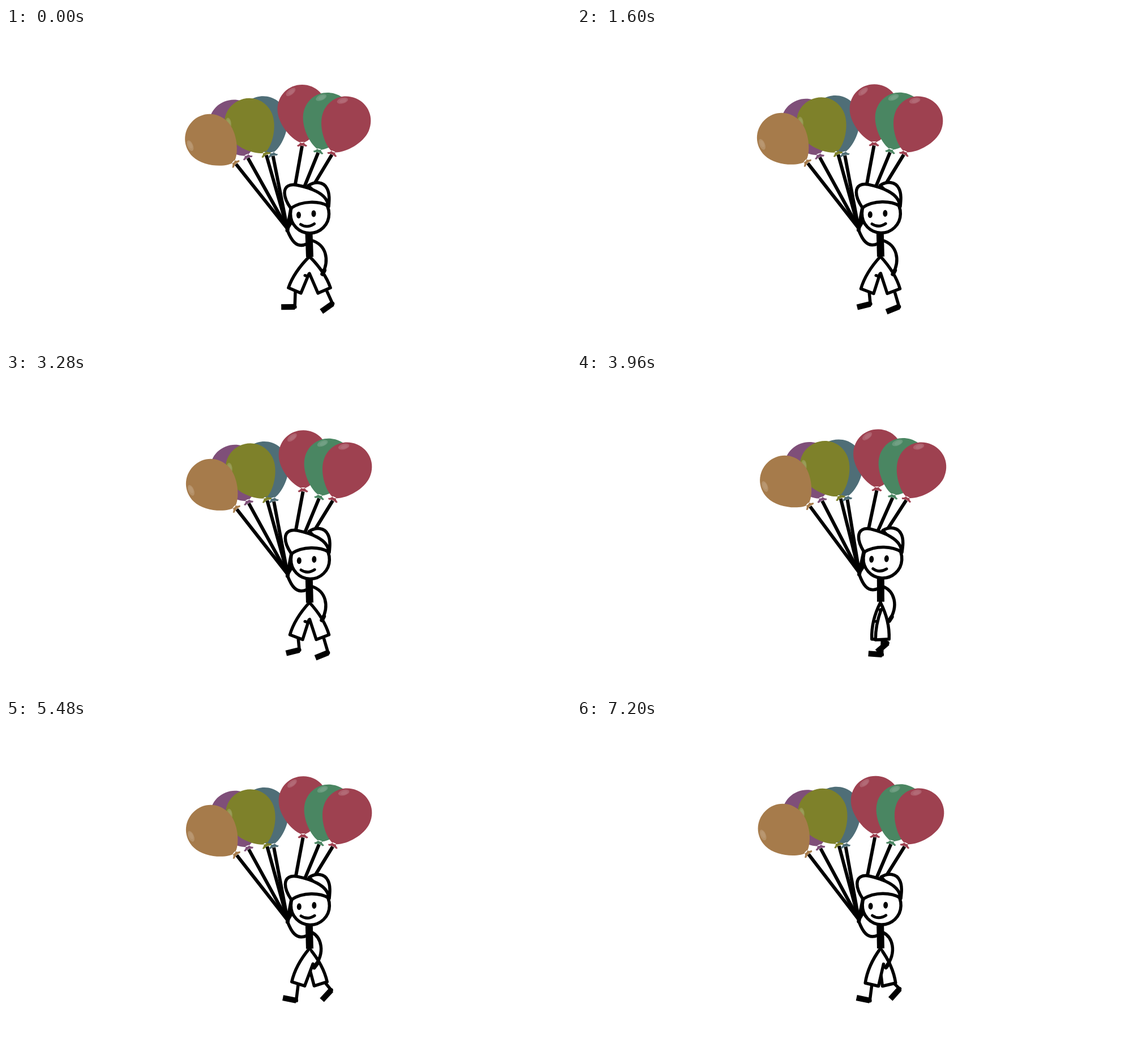
Animation, 998 px wide and 561 px high, one loop 7.24 s. Source, as an HTML page with a canvas:

```html
<!DOCTYPE html>
<html lang="en">
<head>
<meta charset="utf-8">
<title>Walking with balloons</title>
<style>
  html, body { margin: 0; width: 100%; height: 100%; overflow: hidden; background: #fff; }
  canvas { display: block; }
</style>
</head>
<body>
<canvas id="stage" width="998" height="561"></canvas>
<script>
const ctx = document.getElementById('stage').getContext('2d');
const LOOP = 7240, STEP = 40, CYCLE = 21;
const HAND = [497, 354], WAIST = [536, 403], CROTCH = [535, 434];
const { PI, sin, cos } = Math;

// back to front: neck and tilt in degrees
const balloons = [
  { x: 425, y: 224, tilt: -23, colour: '#7f4f79' },
  { x: 470, y: 220, tilt: -16, colour: '#4f6e77' },
  { x: 457, y: 219, tilt: -28, colour: '#7e812a' },
  { x: 402, y: 236, tilt: -46, colour: '#a67b4b' },
  { x: 523, y: 202, tilt: 0, colour: '#9e4150' },
  { x: 553, y: 214, tilt: 15, colour: '#4a8662' },
  { x: 578, y: 218, tilt: 23, colour: '#9e4150' }
];

const rad = d => d * PI / 180;
const clamp = (v, lo, hi) => Math.max(lo, Math.min(hi, v));
const mix = (a, b, k) => a.map((v, i) => v + (b[i] - v) * k);
const polar = ([x, y], r, angle) => [x + r * cos(angle), y + r * sin(angle)];

function pen(width, cap = 'round') {
  ctx.strokeStyle = '#000';
  ctx.lineWidth = width;
  ctx.lineCap = cap;
  ctx.lineJoin = 'round';
}

function line(a, b, width, cap) {
  pen(width, cap);
  ctx.beginPath();
  ctx.moveTo(...a);
  ctx.lineTo(...b);
  ctx.stroke();
}

function shape(d, width, fill) {
  const path = new Path2D(d);
  if (fill) { ctx.fillStyle = fill; ctx.fill(path); }
  if (width) { pen(width); ctx.stroke(path); }
}

function oval(x, y, rx, ry, turn, fill) {
  ctx.fillStyle = fill;
  ctx.beginPath();
  ctx.ellipse(x, y, rx, ry, turn, 0, 2 * PI);
  ctx.fill();
}

function turnAbout(x, y, angle) {
  ctx.translate(x, y);
  ctx.rotate(angle);
  ctx.translate(-x, -y);
}

function balloon({ x, y, tilt, colour }) {
  ctx.save();
  ctx.translate(x, y);
  ctx.rotate(rad(tilt));
  const w = 43.5, top = -102, mid = .57 * top;
  shape(`M0 1 C${-w * .38} -2 ${-w} ${mid * .55} ${-w} ${mid}
    C${-w} ${mid - 25} ${-w * .56} ${top} 0 ${top}
    C${w * .56} ${top} ${w} ${mid - 25} ${w} ${mid}
    C${w} ${mid * .55} ${w * .38} -2 0 1Z
    M-3 -1 Q-4 3 -9 5 Q-8 8 -6 7 Q0 4 6 7 Q8 8 9 5 Q4 3 3 -1Z`, 0, colour);
  ctx.translate(0, mid);
  if (tilt < 0) ctx.rotate(rad(-30));
  oval(-20, -31, 10, 5, rad(-38), 'rgba(255,255,255,.16)');
  oval(-19, -31, 6.5, 3.2, rad(-38), 'rgba(255,255,255,.07)');
  ctx.restore();
}

// the second step is slower than the first
function stride(f) {
  return f < 8 ? PI * f / 8 : PI + PI * (f - 8) / 13;
}

// stride angle 0 is fully forward, PI fully back
function pose(a) {
  const thigh = rad(90 + 23.5 * cos(a));
  const knee = polar(WAIST, 65.5, thigh);
  const bent = ((1 + cos(a - rad(255))) / 2) ** 2;
  const ankle = [543.5 - 34.5 * cos(a - rad(15)), 495 - 22 * bent];
  const pitch = rad(18 + 30 * cos(a - rad(235)));
  return {
    ankle,
    x: knee[0],
    left: polar(knee, 12, thigh + PI / 2),
    right: polar(knee, 12, thigh - PI / 2),
    shin: .5 + .4 * bent,
    toe: polar(ankle, 24, PI - pitch)
  };
}

function leg(p, otherX, inner) {
  line(mix(p.left, p.right, p.shin), p.ankle, 5.5);
  line(p.ankle, p.toe, 10, 'butt');
  oval(...p.ankle, 3.5, 3.5, 0, '#000');

  // the side facing the other leg stops at the crotch
  const openL = clamp(1 + (otherX - p.x) / 15, 0, 1);
  const openR = clamp(1 + (p.x - otherX) / 15, 0, 1);
  const topL = mix(inner, WAIST, openL), topR = mix(inner, WAIST, openR);
  const bend = (a, b, k) => [(a[0] + b[0]) / 2 + k, (a[1] + b[1]) / 2];
  const cl = bend(topL, p.left, -9 * openL), cr = bend(topR, p.right, 9 * openR);
  const d = `M${topL} Q${cl} ${p.left} L${p.right} Q${cr} ${topR}`;
  shape(`${d} L${WAIST}Z`, 0, '#fff');
  shape(d, 5.5);
}

function head(angle) {
  ctx.save();
  turnAbout(535, 364, angle);
  shape('M502.500 328 a34 34 0 1 0 68 0 a34 34 0 1 0 -68 0Z', 5.5, '#fff');
  oval(517, 330, 4, 6, 0, '#000');
  oval(543.500, 327.500, 4, 6, 0, '#000');
  shape('M520.500 346.500 Q532 354 544.500 345.500', 5);
  shape('M534 278 C546 270 561 271 567 283 C572 292 571 304 570 315 L556 300Z', 5.5, '#fff');
  shape(`M503 318 C496 308 492 299 492 291 C492 279 501 275 513 277
    C534 281 568 291 569 314 C553 305 524 304 503 318Z`, 5.5, '#fff');
  ctx.restore();
}

function upperBody(w) {
  ctx.save();
  ctx.translate(0, -2.2 * w);
  turnAbout(536, 402, .0332 * w);
  for (const { x, y, tilt } of balloons) {
    line(polar([x, y], 6, rad(90 + tilt)), HAND, 6, 'butt');
  }
  line([499, 341], [497, 357], 7);
  balloons.forEach(balloon);
  line([535, 362], [536.5, 404], 13, 'butt');
  shape('M497 357 C503 372 512 390 531 381', 5.5);
  head(.024 * w);
  ctx.restore();
}

function arm(s) {
  const end = [542 + 17 * s, 437 - 3 * s];
  const bend = [565 + 7 * s, 408];
  shape(`M541 375 C${554 + 11 * s} 383 ${bend} ${end}`, 5.5);
  line(mix(end, bend, .25), end, 7.5);
}

// two rises in each stride, the second longer and higher
function sway(f) {
  const [k, high] = f < 9 ? [f / 9, .82] : [(f - 9) / 12, 1];
  return high * sin(PI * k) ** 2;
}

function draw(f) {
  const a = stride(f), s = (1 + cos(a)) / 2;
  const near = pose(a + PI), far = pose(a);
  ctx.fillStyle = '#fff';
  ctx.fillRect(0, 0, 998, 561);
  leg(far, near.x, CROTCH);
  line([528, 436.5], [533, 438], 5);
  leg(near, far.x, [543 - 7 * s, 430 + 3 * s]);
  upperBody(sway(f));
  arm(s);
}

const start = performance.now();
function tick() {
  const t = (performance.now() - start) % LOOP;
  draw(Math.floor(t / STEP) % CYCLE);
  requestAnimationFrame(tick);
}
tick();
</script>
</body>
</html>
```
